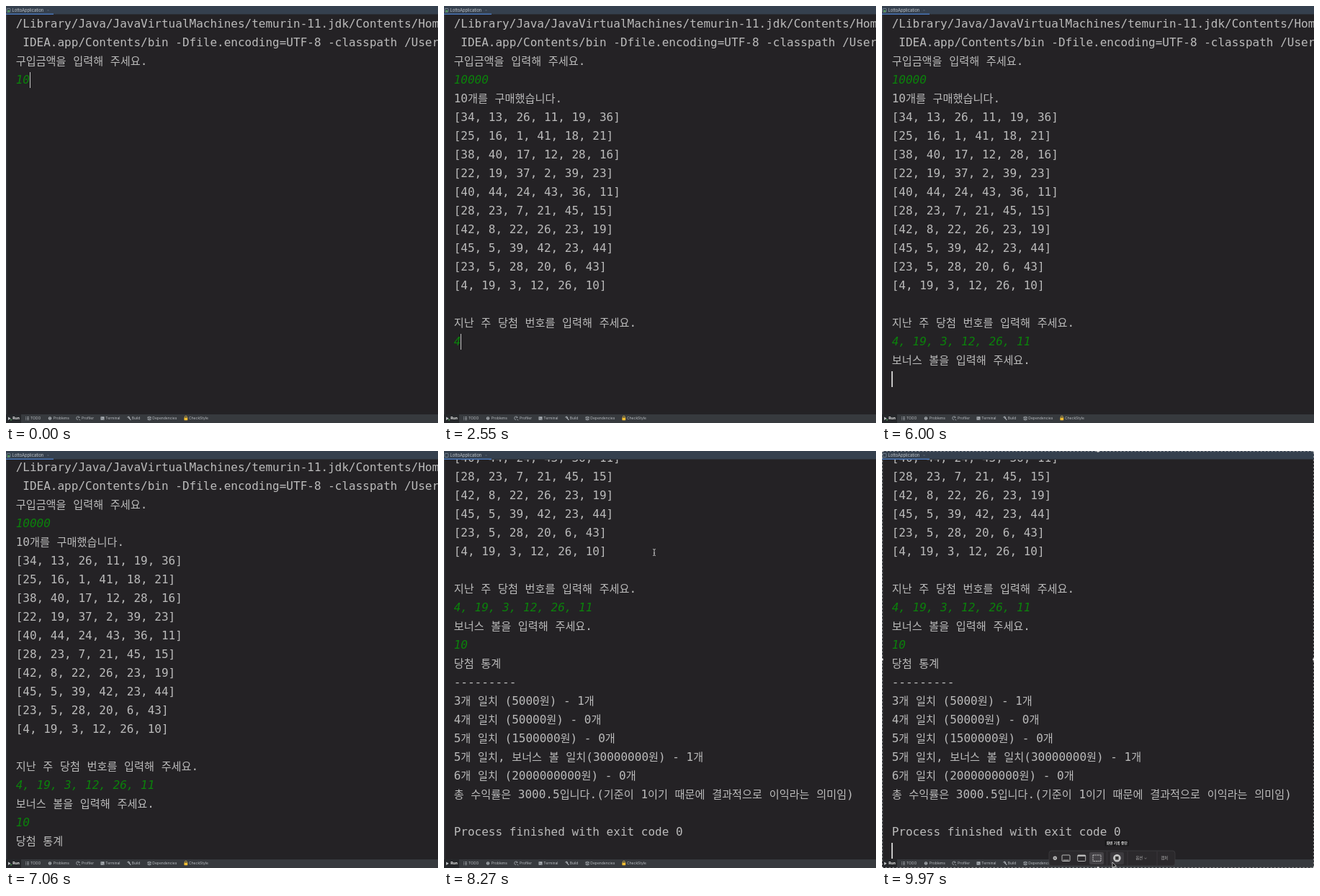
An HTML page for the animation above (10 s loop, 600x580 px).

```html
<!DOCTYPE html>
<html lang="ko">
<head>
<meta charset="utf-8">
<title>LottoApplication</title>
<style>
  html, body { margin: 0; width: 100%; height: 100%; overflow: hidden; background: #242225; }
  #stage { position: relative; width: 600px; height: 580px; overflow: hidden; background: #242225; }
  #console { position: absolute; left: 0; top: 12px; width: 600px; height: 556px; overflow: hidden; }
  #rows { position: absolute; left: 13.7px; top: 0; font: 16px/26px "DejaVu Sans Mono", monospace; color: #bbb; white-space: pre; }
  #rows > div { height: 26px; }
  .ko { font: 15.2px/0 "Noto Sans CJK KR", "Noto Sans CJK", sans-serif; }
  #rows .input { color: #0b820b; font-style: italic; }
  #rows #caret { position: absolute; width: 1.3px; height: 21.5px; background: #c4c4c4; }
  svg { position: absolute; left: 0; top: 0; font-family: Inter, sans-serif; }
  svg .ui { font-family: "Noto Sans CJK KR", "Noto Sans CJK", sans-serif; }
</style>
</head>
<body>
<div id="stage">
  <div id="console"><div id="rows"></div></div>
  <svg width="600" height="580" viewBox="0 0 600 580">
    <rect width="1.4" height="580" fill="#35383d"/>
    <rect width="600" height="11.5" fill="#35404e"/>
    <rect y="10.6" width="66" height="1.4" fill="#4a78bd"/>
    <rect x="1" y="3.5" width="5" height="5" rx="1" fill="none" stroke="#8797a5" stroke-width=".7"/>
    <path id="liveTab" d="M2.5 5l3.5 2-3.5 2z" fill="#55a45c"/>
    <text x="8.5" y="8" font-size="5.7" fill="#c3c8ce">LottoApplication</text>
    <path d="M57.5 5l2 2m0-2l-2 2" stroke="#68727e" stroke-width=".5"/>

    <rect y="568" width="600" height="12" fill="#373a3e"/>
    <rect y="568" width="21" height="12" fill="#25272a"/>
    <path d="M3 571.5l3.6 2.2-3.6 2.2z" fill="#c2c5c8"/>
    <circle id="liveRun" cx="7" cy="575.5" r=".9" fill="#55a45c"/>
    <g font-size="5" fill="#b9bdc1" id="tools">
      <text x="9.3" y="575.4" font-weight="700" fill="#f0f0f0">Run</text>
    </g>
    <g fill="none" stroke="#a9aeb3" stroke-width=".8">
      <path d="M27 571.7h1m1 0h3m-5 1.8h1m1 0h3m-5 1.8h1m1 0h3"/>
      <circle cx="61" cy="573.5" r="2.2" fill="#a9aeb3" stroke="none"/>
      <path d="M61 572v1.6m0 .6v.8" stroke="#373a3e"/>
      <path d="M102.3 573a2.3 2.3 0 1 0-2.3 2.5m0-2.5l1.8-1m-.5 3l2 1"/>
      <rect x="131.5" y="571.2" width="5" height="4.6" fill="#a9aeb3" stroke="none"/>
      <path d="M132.5 572.4l1.1 1-1.1 1m1.8.3h1.4" stroke="#373a3e" stroke-width=".6"/>
      <path d="M168.5 572.2l1.8-1 1.2 1.2-1.4 1m.8-.6l2.4 3" stroke-width="1.2"/>
      <path d="M196.5 572.2l2.6-1 2.6 1-2.6 1zm0 1.6l2.6 1 2.6-1m-5.2 1.3l2.6 1 2.6-1"/>
    </g>
    <path d="M248.2 572.8v-1a1.6 1.6 0 0 1 3.2 0v1" fill="none" stroke="#d8b64a" stroke-width=".8"/>
    <rect x="247.4" y="572.5" width="4.8" height="3.7" rx=".6" fill="#f0bd32"/>

    <g id="capture">
      <rect x=".6" y=".6" width="598.8" height="578.8" fill="none" stroke="#d5d5d5" stroke-width="1" stroke-dasharray="2.5 2.5" opacity=".65"/>
      <g id="handles" fill="#e6e6e6"></g>
      <rect x="232" y="556" width="175" height="21" rx="3.5" fill="#2b292c" stroke="#454348" stroke-width=".6"/>
      <rect x="288" y="558" width="20" height="17" rx="2" fill="#454347"/>
      <rect x="317" y="558" width="19" height="17" rx="2" fill="#3c3a3e"/>
      <path d="M312.5 557v19M341 557v19M382 557v19" stroke="#444247" stroke-width=".6"/>
      <circle cx="240.3" cy="566.3" r="2.7" fill="#bbb"/>
      <path d="M239.3 565.3l2 2m0-2l-2 2" stroke="#2b292c" stroke-width=".7"/>
      <g fill="none" stroke="#c6c6c6" stroke-width=".9">
        <rect x="250" y="562" width="11" height="8.5" rx="1"/>
        <path d="M251.5 569h8"/>
        <rect x="271.7" y="562" width="11" height="8.5" rx="1"/>
        <path d="M272 563h10.5" stroke-width="1.8"/>
        <rect x="293" y="562" width="11" height="8.5" stroke="#eee" stroke-dasharray="1.5 1"/>
        <circle cx="326.4" cy="566.2" r="4.6" fill="#bdbdbd" stroke="#d2d2d2" stroke-width="1.3"/>
      </g>
      <rect x="324.2" y="564" width="4.4" height="4.4" rx=".5" fill="#333"/>
      <g class="ui" font-size="5.2" fill="#b8b8b8">
        <text x="352.5" y="568.2">옵션</text>
        <text x="387.5" y="568.2">캡처</text>
      </g>
      <path d="M364.5 566l1.5 1.2 1.5-1.2" fill="none" stroke="#aaa" stroke-width=".6"/>
    </g>
    <g id="tip">
      <rect x="309.5" y="541" width="33.5" height="8.5" rx="1" fill="#19181a"/>
      <text class="ui" x="326.3" y="547" font-size="4.8" font-weight="700" fill="#e4e4e4" text-anchor="middle">화면 기록 중단</text>
    </g>
    <g id="pointer">
      <path id="beam" d="M-1.8-4.5q1.8 0 1.8 1.2v6.6q0 1.2-1.8 1.2M1.8-4.5q-1.8 0-1.8 1.2M1.8 4.5q-1.8 0-1.8-1.2M-1 1h2" fill="none" stroke="#d4d4d4" stroke-width=".9"/>
      <path id="arrow" d="M0 0v7.6l1.8-1.7 1.2 2.7 1.3-.6-1.2-2.6h2.4z" fill="#111" stroke="#eee" stroke-width=".7"/>
    </g>
  </svg>
</div>
<script>
const LOOP = 10000, ROW = 26, BLINK = 590;
const $ = id => document.getElementById(id);
const rowsBox = $('rows');

// Moments when the program prints, and when Enter is pressed.
const PRINT = { tickets: 1420, bonus: 5790, stats: 7030, exit: 7550 };
const ENTER = { money: 940, numbers: 5640, bonus: 6670 };

const script = [
  [0, '/Library/Java/JavaVirtualMachines/temurin-11.jdk/Contents/Home'],
  [0, ' IDEA.app/Contents/bin -Dfile.encoding=UTF-8 -classpath /Users/'],
  [0, '구입금액을 입력해 주세요.'],
  [0, ''],
  ...[
    '10개를 구매했습니다.',
    '[34, 13, 26, 11, 19, 36]',
    '[25, 16, 1, 41, 18, 21]',
    '[38, 40, 17, 12, 28, 16]',
    '[22, 19, 37, 2, 39, 23]',
    '[40, 44, 24, 43, 36, 11]',
    '[28, 23, 7, 21, 45, 15]',
    '[42, 8, 22, 26, 23, 19]',
    '[45, 5, 39, 42, 23, 44]',
    '[23, 5, 28, 20, 6, 43]',
    '[4, 19, 3, 12, 26, 10]',
    '',
    '지난 주 당첨 번호를 입력해 주세요.'
  ].map(s => [PRINT.tickets, s]),
  [0, ''],
  [PRINT.bonus, '보너스 볼을 입력해 주세요.'],
  [0, ''],
  ...[
    '당첨 통계',
    '---------',
    '3개 일치 (5000원) - 1개',
    '4개 일치 (50000원) - 0개',
    '5개 일치 (1500000원) - 0개',
    '5개 일치, 보너스 볼 일치(30000000원) - 1개',
    '6개 일치 (2000000000원) - 0개',
    '총 수익률은 3000.5입니다.(기준이 1이기 때문에 결과적으로 이익라는 의미임)'
  ].map(s => [PRINT.stats, s]),
  [PRINT.exit, ''],
  [PRINT.exit, 'Process finished with exit code 0']
];

const rows = script.map(([at, text]) => {
  const el = document.createElement('div');
  el.innerHTML = text.replace(/[가-힣]+/g, '<span class="ko">$&</span>');
  rowsBox.append(el);
  return { at, el };
});

const inputs = [
  { row: 3, text: '10000', keys: [0, 0, 30, 190, 350] },
  { row: 17, text: '4, 19, 3, 12, 26, 11',
    keys: [2430, 2620, 2720, 2820, 2970, 3150, 3240, 3390, 3560, 3650, 3760, 3850,
           3970, 4060, 4150, 4390, 4670, 4800, 5000, 5150] },
  { row: 19, text: '10', keys: [6090, 6240] }
];
inputs.forEach(i => rows[i.row].el.className = 'input');

const caret = document.createElement('i');
caret.id = 'caret';
rowsBox.append(caret);

// Row the caret rests on from each moment.
const caretRows = [
  [0, 3], [ENTER.money, 4], [PRINT.tickets, 17], [ENTER.numbers, 18],
  [PRINT.bonus, 19], [ENTER.bonus, 20], [PRINT.stats, 28], [PRINT.exit, 30]
];
const resets = [...caretRows.map(c => c[0]), ...inputs.flatMap(i => i.keys)];

const svgNode = (tag, attrs, parent) => {
  const el = document.createElementNS('http://www.w3.org/2000/svg', tag);
  for (const k in attrs) el.setAttribute(k, attrs[k]);
  parent.append(el);
  return el;
};
[['TODO', 34], ['Problems', 65.7], ['Profiler', 105], ['Terminal', 138.3],
 ['Build', 174.7], ['Dependencies', 203.3], ['CheckStyle', 254]]
  .forEach(([label, x]) => svgNode('text', { x, y: 575.4 }, $('tools')).textContent = label);
for (const cx of [0, 300, 600])
  for (const cy of [0, 290, 580])
    if (cx !== 300 || cy !== 290) svgNode('circle', { cx, cy, r: 1.8 }, $('handles'));

const progress = (t, from, to) => Math.min(1, Math.max(0, (t - from) / (to - from)));
const easeInOut = p => p < .5 ? 2 * p * p : 1 - 2 * (1 - p) ** 2;
const show = (el, on) => el.style.visibility = on ? 'visible' : 'hidden';

const mousePath = [[7820, 362, 96], [8270, 292, 141], [8820, 304, 300], [9000, 304, 300], [9700, 320, 572]];
function mouseAt(t) {
  const i = Math.max(1, mousePath.findIndex(p => p[0] > t));
  if (t >= mousePath.at(-1)[0]) return mousePath.at(-1).slice(1);
  const [t0, x0, y0] = mousePath[i - 1], [t1, x1, y1] = mousePath[i];
  const p = easeInOut(progress(t, t0, t1));
  return [x0 + (x1 - x0) * p, y0 + (y1 - y0) * p];
}

function render(t) {
  rows.forEach(r => show(r.el, t >= r.at));

  let column = 0;
  const row = caretRows.filter(c => c[0] <= t).pop()[1];
  for (const i of inputs) {
    const count = i.keys.filter(k => k <= t).length;
    const text = i.text.slice(0, count);
    if (rows[i.row].el.textContent !== text) rows[i.row].el.textContent = text;
    if (i.row === row) column = count;
  }
  caret.style.left = `calc(${column}ch - .3px)`;
  caret.style.top = row * ROW + 2.3 + 'px';
  const idle = t - Math.max(...resets.filter(k => k <= t));
  show(caret, idle % (2 * BLINK) < BLINK);

  const scroll = 197 * easeInOut(progress(t, 7038, 7360))
               + 2 * ROW * easeInOut(progress(t, PRINT.exit, 7670));
  rowsBox.style.transform = `translateY(${-scroll}px)`;

  const running = t < PRINT.stats + 150;
  show($('liveTab'), running);
  show($('liveRun'), running);

  $('capture').style.opacity = progress(t, 8940, 9090);
  show($('tip'), t >= 9760);

  const [x, y] = mouseAt(t);
  $('pointer').setAttribute('transform', `translate(${x} ${y})`);
  const overBar = y > 556;
  show($('beam'), t >= 7820 && !overBar);
  show($('arrow'), t >= 7820 && overBar);
}

function tick() {
  render(performance.now() % LOOP);
  requestAnimationFrame(tick);
}
tick();
</script>
</body>
</html>
```
